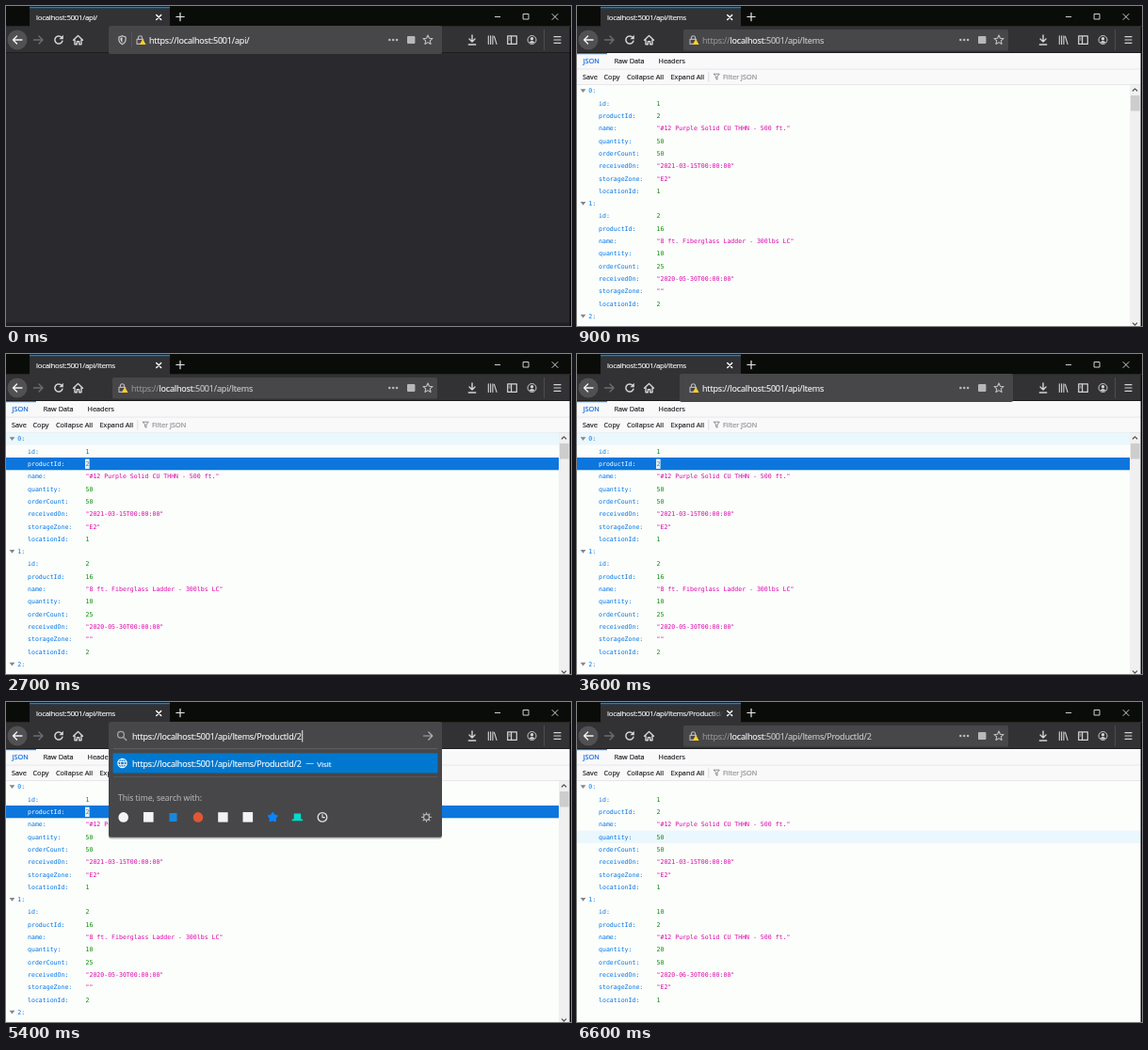
These frames come from a looping animation (600 by 340 pixels, 6900 ms). An HTML page:

```html
<!DOCTYPE html>
<html lang="en">
<head>
<meta charset="utf-8">
<title>Browser demo</title>
<style>
  html, body { margin: 0; width: 100%; height: 100%; overflow: hidden; background: #2a2a2e; }
  svg { display: block; width: 100%; height: 100%; }
  text { white-space: pre; font-family: "Open Sans", "Noto Sans", sans-serif; stroke-width: .16; }
  .mono text { font: 6.55px "DejaVu Sans Mono", "Noto Sans Mono", monospace; stroke-width: 0; }
  .url { letter-spacing: -.018em; }
  .title { letter-spacing: -.035em; }
  .line { fill: none; stroke: #d4d4d6; stroke-width: 1.4; stroke-linecap: round; stroke-linejoin: round; }
</style>
</head>
<body>
<svg id="stage" viewBox="0 0 600 340" preserveAspectRatio="none"></svg>
<script>
const LOOP = 6900;
const BASE = "https://localhost:5001/api/";
const ROW = 13.3;
const TOP = 90;

const rect = (x, y, w, h, fill, more = "") =>
  `<rect x="${x}" y="${y}" width="${w}" height="${h}" fill="${fill}" ${more}/>`;
const circle = (x, y, r, fill, more = "") =>
  `<circle cx="${x}" cy="${y}" r="${r}" fill="${fill}" ${more}/>`;
const line = (d, more = "") => `<path class="line" d="${d}" ${more}/>`;
const shape = (d, fill, more = "") => `<path d="${d}" fill="${fill}" ${more}/>`;
const text = (x, y, size, fill, str, more = "") =>
  `<text x="${x}" y="${y}" font-size="${size}" fill="${fill}" stroke="${fill}" ${more}>${str}</text>`;
const group = (id, body, more = "") => `<g id="${id}" ${more}>${body}</g>`;

function star(cx, cy, outer, inner) {
  const points = [];
  for (let i = 0; i < 10; i++) {
    const r = i % 2 ? inner : outer;
    const a = (i / 5 - 0.5) * Math.PI;
    points.push(`${(cx + r * Math.cos(a)).toFixed(2)} ${(cy + r * Math.sin(a)).toFixed(2)}`);
  }
  return `M${points.join("L")}Z`;
}

function gear(cx, cy) {
  let d = "";
  for (let i = 0; i < 8; i++) {
    const a = i * Math.PI / 4, c = Math.cos(a), s = Math.sin(a);
    d += `M${cx + 3.4 * c} ${cy + 3.4 * s}L${cx + 4.9 * c} ${cy + 4.9 * s}`;
  }
  return circle(cx, cy, 3, "none", 'stroke="#b0b0b3" stroke-width="1.3"') +
    line(d, 'style="stroke:#b0b0b3;stroke-width:1.2"');
}

function windowBar() {
  return rect(0, 0, 600, 22, "#0a0c09") +
    rect(25, 1, 149, 22, "#323234") + rect(25, 0.8, 149, 1.4, "#0a84e8") +
    text(32, 15.2, 7.9, "#f4f4f5", "", 'id="title" class="title" clip-path="url(#tabClip)"') +
    rect(143, 4, 12, 16, "url(#tabFade)") +
    line("M159.7 9.5l5 5m0-5l-5 5", 'style="stroke:#fff;stroke-width:1.4"') +
    line("M180.8 11.5h8.4M185 7.3v8.4", 'style="stroke:#e8e8e8;stroke-width:1.2"') +
    line("M519.3 11.5h5.4M549.5 8.5h5.5v5.5h-5.5zM580 8.5l6 6m0-6l-6 6", 'style="stroke:#e4e4e4;stroke-width:.9"');
}

function toolbar() {
  return rect(0, 21.3, 600, 28.7, "#323234") + rect(0, 49, 600, 1, "#1d1d1f") +
    circle(12, 36, 10.5, "#515153") +
    line("M17 36H7.5m4-4l-4 4l4 4", 'style="stroke:#f2f2f2"') +
    line("M29.5 36h9.5m-4-4l4 4l-4 4", 'style="stroke:#6d6d70"') +
    line("M59 33.2A4.1 4.1 0 1 0 59.9 37.2", 'style="stroke-width:1.5"') + shape("M60.8 30.8v4.4h-4.4z", "#d4d4d6") +
    line("M71.5 36.3l5-4.8l5 4.8M73 36v4.7h2.3v-3h2.4v3H80V36") +
    line("M495 31v7m-3-3l3 3l3-3M491.3 41h7.4") +
    line("M512.3 31.8v8.6M514.6 31.8v8.6M516.9 31.8v8.6M518.4 32.2l2.6 8.2", 'style="stroke-width:1.1"') +
    line("M532.7 31.8h9.6v8.6h-9.6zM536.6 32v8.2", 'style="stroke-width:1.2"') +
    line("M534 34.2h1.2M534 36h1.2", 'style="stroke-width:.8"') +
    circle(558.5, 36, 4.5, "none", 'stroke="#c8c8ca" stroke-width="1"') +
    circle(558.5, 34.8, 1.7, "#d4d4d6") + shape("M555.5 38.4q3-3 6 0q-3 2.8-6 0z", "#d4d4d6") +
    rect(571, 25, 0.8, 22, "#545457") +
    line("M582 32.7h7M582 36h7M582 39.3h7", 'style="stroke-width:1.2"');
}

const lock = x =>
  line(`M${x - 4} 35.4h6.6v5h-6.6zM${x - 2.6} 35.2v-1.4a2.1 2.1 0 0 1 4.2 0v1.4`, 'style="stroke:#b8b8ba;stroke-width:1.1"') +
  shape(`M${x + 2.2} 35l3.4 6h-6.8z`, "#ffcf2e");

function addressBar() {
  const shield = line("M123.5 31.7l3.6 1.2v2.6q0 3.4-3.6 5.2q-3.6-1.8-3.6-5.2v-2.6z", 'style="stroke-width:1.1"') +
    shape("M123.5 33.3v5.6q-2-1.2-2-3.6v-1.3z", "#d4d4d6") + rect(133, 28, 0.7, 16, "#5e5e61");
  return rect(113, 25, 345, 22.5, "#474749", 'id="barIdle" rx="1.5"') +
    rect(109, 21, 354, 30, "#474749", 'id="barFocus" rx="2"') +
    group("lockFirst", shield + lock(143)) +
    group("lockPage", lock(124)) +
    rect(133, 30, 129, 13, "#0078d7", 'id="marked"') +
    text(133, 39.8, 9, "#f4f4f5", "", 'id="address" class="url"') +
    [407.3, 411.2, 415.1].map(x => circle(x, 36, 1.3, "#b8b8ba")).join("") +
    rect(426, 32, 8.4, 8, "#b8b8ba", 'rx="1"') +
    line(star(448, 36.2, 5.2, 2.4), 'style="stroke:#c0c0c2;stroke-width:1.1"');
}

function panel() {
  const rule = (y, fill) => rect(114, y, 344, 0.8, fill);
  const engines = circle(124.7, 122.4, 5.3, "#f4f4f4") + rect(146, 117, 10.6, 10.6, "#f4f4f4") +
    rect(173.5, 118, 8, 9, "#1689dc") + circle(204, 122.4, 5.3, "#de5833") +
    rect(225.2, 117.2, 10.4, 10.4, "#f2f2f2") + rect(251.5, 117, 10.6, 10.6, "#f4f4f4");
  return rect(109, 21, 354, 124.5, "#000", 'opacity=".25" rx="3"') +
    rect(109, 21, 354, 122.7, "#474749", 'rx="2"') +
    circle(122, 34.8, 3.4, "none", 'stroke="#a4a4a6" stroke-width="1.3"') +
    line("M124.6 37.4l3.2 3.2", 'style="stroke:#a4a4a6"') +
    line("M443.5 36h9.3m-4-4l4 4l-4 4", 'style="stroke:#b0b0b2;stroke-width:1.2"') + rule(49.3, "#67676a") +
    rect(113.6, 54.4, 344.9, 21, "#0078d0") +
    circle(123.5, 65, 4.6, "none", 'stroke="#fff" stroke-width="1.1"') +
    line("M119 63.3h9M119 66.7h9M123.5 60.4q-4 4.6 0 9.2q4-4.6 0-9.2", 'style="stroke:#fff;stroke-width:.9"') +
    text(134, 39.8, 9, "#f6f6f6", "", 'id="typed" class="url"') +
    text(134, 68.5, 9, "#fff", "", 'id="result" class="url"') +
    group("visit", rect(5, 65, 8, 0.9, "#b4d8f4") + text(16.5, 68.5, 7.9, "#fff", "Visit")) +
    rule(79.2, "#5a5a5d") + text(119, 105, 8.6, "#aeaeb0", "This time, search with:") + engines +
    shape(star(283.3, 122.6, 5.4, 3.3), "#0a84ff", 'stroke="#0a84ff" stroke-linejoin="round"') +
    shape("M305.7 118.5h7.4v6h2v1.8h-11.4v-1.8h2z", "#00ddc8") +
    circle(336, 122.4, 4.8, "none", 'stroke="#e4e4e4" stroke-width="1.3"') +
    line("M336 119.6v3h2.4", 'style="stroke:#e4e4e4;stroke-width:1.1"') + gear(446.5, 122.4);
}

const label = (x, y, str, fill = "#1c1c20") => text(x, y, 7.3, fill, str);

function viewer() {
  return rect(0, 50, 599, 290, "#fcfefc") +
    rect(0, 50, 599, 33, "#f9f9fa") + rect(0, 66.7, 599, 0.7, "#dfdfe2") + rect(0, 83, 599, 0.7, "#dfdfe2") +
    rect(0, 50, 32, 1.2, "#0a84ff") +
    label(6.5, 61, "JSON", "#0060df") + label(39.5, 61, "Raw Data") + label(86.5, 61, "Headers") +
    label(6, 78, "Save") + label(28.5, 78, "Copy") + label(53, 78, "Collapse All") + label(99.5, 78, "Expand All") +
    rect(139.5, 70, 0.7, 10.5, "#d4d4d8") +
    line("M145.3 72.2h6l-2.3 2.8v3.3l-1.4-1v-2.3z", 'style="stroke:#838389;stroke-width:.9"') +
    label(155, 78, "Filter JSON", "#8a8a90");
}

const KEYS = ["id", "productId", "name", "quantity", "orderCount", "receivedOn", "storageZone", "locationId"];
const WIRE = "#12 Purple Solid CU THHN - 500 ft.";
const first = [1, 2, WIRE, 50, 50, "2021-03-15T00:00:00", "E2", 1];
const ladder = [2, 16, "8 ft. Fiberglass Ladder - 300lbs LC", 10, 25, "2020-05-30T00:00:00", "", 2];
const spare = [10, 2, WIRE, 20, 50, "2020-06-30T00:00:00", "E2", 1];

function json(items) {
  let row = 0, out = "";
  const put = (x, str, fill) => text(x, (TOP + ROW * row + 2.4).toFixed(2), 6.55, fill, str);
  items.forEach((item, n) => {
    const y = TOP + ROW * row;
    out += shape(`M3.6 ${y - 1.7}h5.8l-2.9 3.8z`, "#858589") + put(12.3, n + ":", "#0074e8");
    row++;
    item.forEach((value, k) => {
      const quoted = typeof value === "string";
      out += put(23, KEYS[k] + ":", "#0074e8") +
        put(84.5, quoted ? `"${value}"` : value, quoted ? "#dd00a9" : "#058b00");
      row++;
    });
  });
  return out;
}

const scrollbar = rect(587, 84, 12, 256, "#f0f0f0") + rect(588, 95, 9.6, 16.5, "#cdcdcd") +
  line("M590.3 90l2.2-2.2l2.2 2.2M590.3 336.8l2.2 2.2l2.2-2.2", 'style="stroke:#505050;stroke-width:1.2"');

const picked = rect(0, 110, 587, 13.3, "#0c76dc") +
  text(23, 119.1, 6.55, "#fff", "productId:") +
  rect(84, 111.6, 4.6, 10.4, "#e6eff6", 'id="pickedValue"') +
  text(84.5, 119.1, 6.55, "#fff", "2", 'id="pickedText"');

const stage = document.getElementById("stage");
stage.innerHTML = `<defs>
  <clipPath id="tabClip"><rect x="25" y="2" width="130" height="20"/></clipPath>
  <linearGradient id="tabFade"><stop stop-color="#323234" stop-opacity="0"/><stop offset="1" stop-color="#323234"/></linearGradient>
  </defs>` +
  rect(0, 0, 600, 340, "#2a2a2e") + rect(0, 336.5, 600, 3.5, "#211e22") +
  group("page", viewer() + rect(0, 0, 587, ROW, "#eaf7fd", 'id="hover"') +
    group("allItems", json([first, ladder, []]) + scrollbar, 'class="mono"') +
    group("found", json([first, spare]), 'class="mono"') +
    group("picked", picked, 'class="mono"')) +
  windowBar() + toolbar() + rect(598.6, 22, 1.4, 318, "#050505") +
  group("bar", addressBar()) + group("panel", panel()) +
  rect(0, 30, 0.9, 12.5, "#fff", 'id="caret"');

const el = {};
stage.querySelectorAll("[id]").forEach(node => el[node.id] = node);

// Typed text by start time; an empty entry closes the panel.
const typing = [
  [0, ""], [300, "I"], [600, "Item"], [900, ""],
  [3900, "Items/P"], [4200, "Items/Prod"], [4500, "Items/Product"],
  [4800, "Items/ProductId"], [5100, "Items/ProductId/"], [5400, "Items/ProductId/2"], [5700, ""]
];
// Row under the pointer, -1 for none.
const hovering = [[0, -1], [1800, 1], [2100, 2], [2700, 0], [3900, -1], [6300, 4]];

const at = (list, t) => list.reduce((now, [start, value]) => t >= start ? value : now, list[0][1]);
const show = (node, on) => node.setAttribute("display", on ? "inline" : "none");
const within = (t, a, b) => t >= a && t < b;

function draw(t) {
  const typed = at(typing, t);
  const loaded = t >= 900, filtered = t >= 5700;
  const path = filtered ? "Items/ProductId/2" : loaded ? "Items" : "";
  const focus = t < 900 || within(t, 3000, 5700);
  const row = at(hovering, t);

  el.title.textContent = (BASE + path).slice(8);
  show(el.page, loaded);
  show(el.allItems, !filtered);
  show(el.found, filtered);
  show(el.hover, row >= 0);
  el.hover.setAttribute("width", filtered ? 599 : 587);
  el.hover.setAttribute("y", TOP - ROW / 2 + ROW * row);
  show(el.picked, within(t, 2100, 5700));
  show(el.pickedValue, t >= 2400);
  el.pickedText.setAttribute("fill", t >= 2400 ? "#4f7f9f" : "#fff");

  show(el.bar, !typed);
  show(el.barFocus, focus);
  show(el.lockFirst, !loaded);
  show(el.lockPage, loaded);
  show(el.marked, within(t, 3000, 3300));
  el.address.setAttribute("x", loaded ? 133 : 152);
  const tone = (idle, str) => {
    const fill = focus ? "#f4f4f5" : idle;
    return `<tspan fill="${fill}" stroke="${fill}">${str}</tspan>`;
  };
  el.address.innerHTML = tone("#929295", "https://") + tone("#f4f4f5", "localhost") + tone("#cbcbcd", ":5001/api/" + path);

  show(el.panel, typed);
  el.typed.textContent = el.result.textContent = BASE + typed;
  const width = typed ? el.typed.getComputedTextLength() : 0;
  el.visit.setAttribute("transform", `translate(${134 + width} 0)`);

  show(el.caret, within(t, 3300, 3600) || within(t, 3900, 5700) || within(t, 300, 600));
  el.caret.setAttribute("x", typed ? 134.6 + width : 262);
}

let last = -1;
function tick(now) {
  const t = Math.floor(now % LOOP / 300) * 300;
  if (t !== last) draw(last = t);
  requestAnimationFrame(tick);
}
draw(0);
requestAnimationFrame(tick);
</script>
</body>
</html>
```
